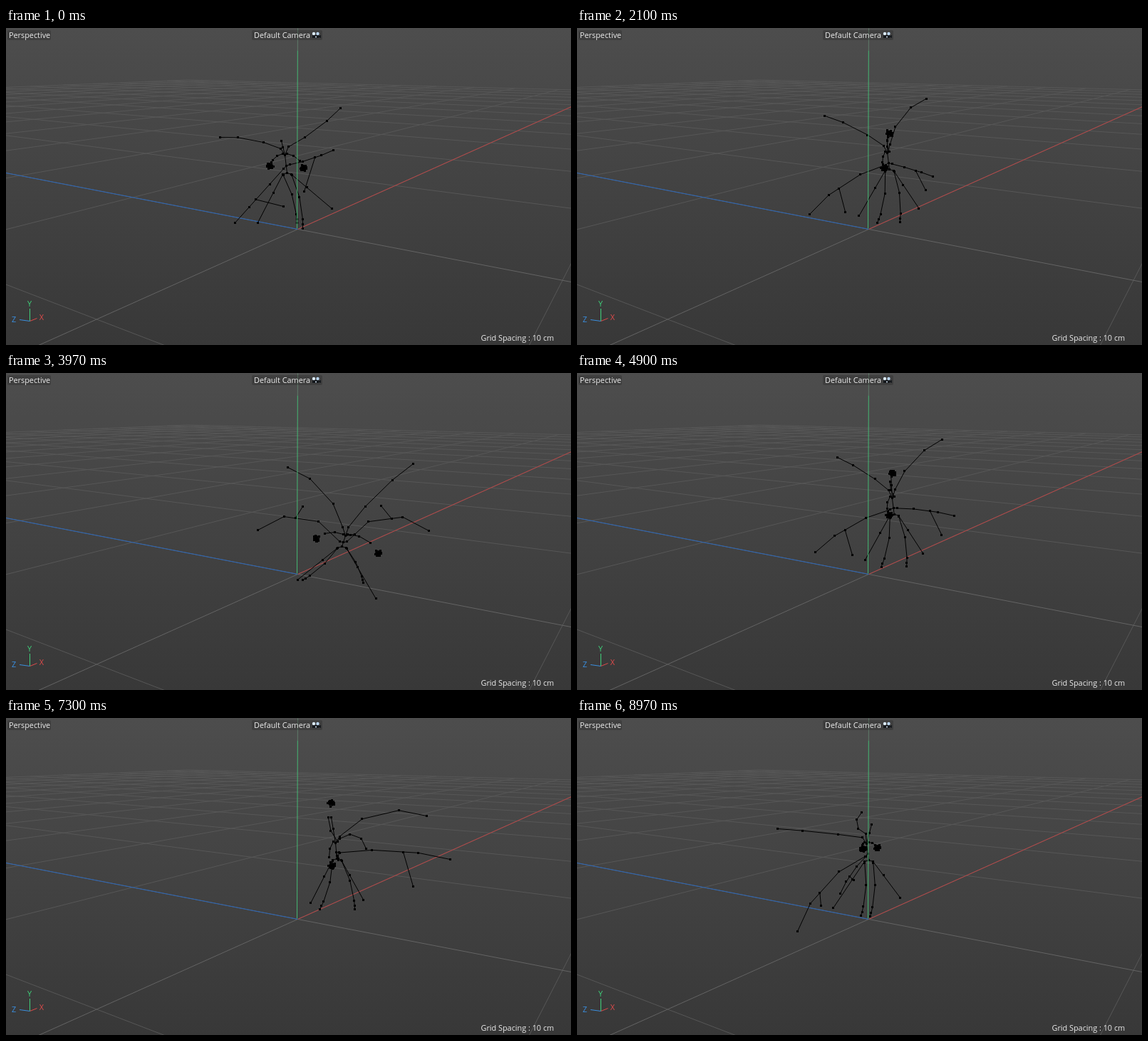
These frames come from a looping animation (793x445 px, 9010 ms). An HTML page with a canvas:

```html
<!DOCTYPE html>
<html lang="en">
<head>
<meta charset="utf-8">
<title>Viewport rig</title>
<style>
html, body { margin: 0; width: 100%; height: 100%; overflow: hidden; }
body { position: relative; background: linear-gradient(#4d4d4d, #383838); }
canvas, svg { position: absolute; left: 0; top: 0; display: block; }
text { font: 10.85px "Open Sans", "Noto Sans", sans-serif; fill: #ececec; }
.tag { fill: #000; opacity: .18; }
.axis { fill: none; stroke-width: 1; }
</style>
</head>
<body>
<canvas id="view" width="793" height="445"></canvas>
<svg width="793" height="445" viewBox="0 0 793 445">
  <rect class="tag" x="2" y="3" width="61" height="14" rx="2"/>
  <rect class="tag" x="345" y="3" width="99" height="14" rx="2"/>
  <text x="4" y="14">Perspective</text>
  <text x="348" y="14">Default Camera</text>
  <text x="666.5" y="439">Grid Spacing : 10 cm</text>
  <path d="M430 10h9v4h-9zM439 11l3-1v4l-3-1z" fill="#15181c"/>
  <circle cx="432" cy="8" r="2.2" fill="#dcebfa"/>
  <circle cx="437.5" cy="8" r="2.2" fill="#b9d5f0"/>
  <circle cx="435" cy="12.5" r="1" fill="#dcebfa"/>
  <path class="axis" stroke="#3fd07a" d="M33.5 411V394"/>
  <path class="axis" stroke="#e04a4a" d="M33.5 411.5L43.5 407.5"/>
  <path class="axis" stroke="#3a8fe0" d="M33.5 411.5L19 409.5"/>
  <g text-anchor="middle">
    <text x="33" y="391" style="fill:#3fd07a">Y</text>
    <text x="50" y="410" style="fill:#e04a4a">X</text>
    <text x="11" y="413" style="fill:#3a8fe0">Z</text>
  </g>
</svg>
<script>
const ctx = document.getElementById('view').getContext('2d');
const FPS = 30, CYCLE = 90, LOOP = 9010;

// Key poses by frame. Joints between a limb's base and its tip follow from rules.
// body: chest, hip | head: offset from chest | upper wings: tip, bend
// lower wings: tip, bend, side tip | skirt: half width, lean
const tracks = {};
function pose(frame, parts) {
  for (const name in parts) (tracks[name] ||= []).push({ frame, p: parts[name] });
}

pose(0, {
  body: [391,178, 394,203], head: [-5,-20],
  upperL: [300,153, .06], upperR: [469,112, .04],
  lowerL: [321,273, 0, 389,250], lowerR: [459,171, .03, 418,229],
  hands: [370,193, 417,196], feet: [408,273, 416,281], skirt: [52,-10]
});
pose(5, {
  body: [380,180, 386,206], head: [-11,-14],
  upperL: [326,137, .2], upperR: [494,126, .04],
  lowerL: [342,203, -.2, 410,206], lowerR: [478,134, .08, 444,198],
  hands: [343,185, 420,184], feet: [405,278, 426,276], skirt: [52,-10]
});
pose(16, {
  body: [452,218, 455,250],
  upperL: [380,80, .1], upperR: [510,72, -.03],
  lowerL: [342,215, .1, 395,250], lowerR: [544,175, -.1, 530,220],
  feet: [430,328, 480,342]
});
pose(29, {
  body: [476,228, 471,243], head: [13,-2],
  upperL: [395,132, .13], upperR: [571,127, -.04],
  lowerL: [353,220, .25, 416,187], lowerR: [593,221, -.25, 526,186],
  hands: [435,232, 522,253], feet: [416,290, 501,294], skirt: [55,13]
});
pose(34, {
  body: [467,175, 466,197], head: [-4,-33],
  upperL: [535,216, -.2], upperR: [596,147, -.13],
  lowerL: [473,199, 0, 470,192], lowerR: [622,207, -.04, 583,250],
  hands: [455,203, 467,122], feet: [432,265, 488,271], skirt: [34,6]
});
pose(39, {
  body: [462,175, 464,197], head: [-6,-36],
  upperL: [505,183, -.34], upperR: [590,137, -.16],
  lowerL: [466,199, 0, 467,188], lowerR: [623,198, -.05, 571,236],
  hands: [457,207, 456,119], feet: [440,268, 489,268], skirt: [37,-2]
});
pose(48, {
  upperL: [400,118, 0], upperR: [545,90, -.05],
  lowerL: [355,235, .05, 405,245], lowerR: [575,190, -.05, 545,228]
});
pose(89, {
  body: [406,176, 409,199], head: [7,-27],
  upperL: [281,155, .01], upperR: [399,132, -.35],
  lowerL: [309,299, .11, 342,263], lowerR: [369,246, .05, 388,227],
  hands: [401,183, 421,182], feet: [398,277, 411,278], skirt: [47,-7]
});

// Smooth Hermite blend through the keys of one part.
function sample(name, f) {
  const keys = tracks[name], last = keys.length - 1;
  let i = 0;
  while (i < last - 1 && keys[i + 1].frame <= f) i++;
  const a = keys[i], b = keys[i + 1];
  const before = keys[Math.max(0, i - 1)], after = keys[Math.min(last, i + 2)];
  const span = b.frame - a.frame, u = (f - a.frame) / span;
  const u2 = u * u, u3 = u2 * u;
  return a.p.map((pa, n) => {
    const pb = b.p[n];
    const ta = (pb - before.p[n]) / (b.frame - before.frame) * span;
    const tb = (after.p[n] - pa) / (after.frame - a.frame) * span;
    return (2 * u3 - 3 * u2 + 1) * pa + (u3 - 2 * u2 + u) * ta
         + (3 * u2 - 2 * u3) * pb + (u3 - u2) * tb;
  });
}

const add = (p, x, y) => [p[0] + x, p[1] + y];
const mix = (a, b, k) => [a[0] + (b[0] - a[0]) * k, a[1] + (b[1] - a[1]) * k];
function toward(a, b, dist) {
  return mix(a, b, dist / (Math.hypot(b[0] - a[0], b[1] - a[1]) || 1));
}

// Joints at the given fractions of a bowed line; bend is the bow's height over its length.
function arc(a, b, bend, stops) {
  const dx = b[0] - a[0], dy = b[1] - a[1];
  return [a, ...stops.map(k => {
    const bow = 4 * k * (1 - k) * bend;
    return add(a, dx * k - dy * bow, dy * k + dx * bow);
  })];
}

function line(a, b, color) {
  ctx.strokeStyle = color;
  ctx.beginPath();
  ctx.moveTo(a[0] + .5, a[1] + .5);
  ctx.lineTo(b[0] + .5, b[1] + .5);
  ctx.stroke();
}

function chain(points) {
  points.forEach((p, i) => {
    if (i) line(points[i - 1], p, '#000');
    ctx.fillStyle = '#000';
    ctx.fillRect(Math.round(p[0]) - 1, Math.round(p[1]) - 1, 3, 3);
  });
}

function hand(wrist, palm) {
  const tip = toward(palm, wrist, -4);
  for (let k = -2; k <= 2; k++) {
    chain(arc(wrist, tip, k * .25, [.4, .7, 1 - Math.abs(k) * .1]));
  }
}

const WING = [.29, .71, 1], LEG = [.02, .43, .83, .93, 1], TAIL = [.38, 1], ARM = [.3, .65];

function rig(f) {
  const get = name => sample(name, f);
  const body = get('body'), chest = body.slice(0, 2), hip = body.slice(2);
  const mid = mix(chest, hip, .6), head = get('head');
  const hands = get('hands'), feet = get('feet'), [width, lean] = get('skirt');
  const drift = ((feet[0] + feet[2]) / 2 - hip[0]) * .6;
  chain([chest, mid, hip]);
  chain(arc(chest, add(chest, ...head), 0, [.55, 1]));

  ['L', 'R'].forEach((s, i) => {
    const side = i * 2 - 1;
    const [ux, uy, uBend] = get('upper' + s);
    const root = toward(add(chest, 0, -8), [ux, uy], 6);
    chain([chest, ...arc(root, [ux, uy], uBend, WING)]);

    const [lx, ly, lBend, bx, by] = get('lower' + s);
    const wing = arc(toward(mid, [lx, ly], 5), [lx, ly], lBend, WING);
    chain([mid, ...wing]);
    chain([mix(wing[1], wing[2], .67), [bx, by]]);

    const palm = hands.slice(i * 2, i * 2 + 2);
    const arm = arc(add(chest, side * 3, -2), palm, side * -.15, ARM);
    chain([chest, ...arm]);
    hand(toward(palm, arm[2], 5), palm);

    const socket = add(hip, side * 6, 2);
    chain([hip, ...arc(socket, feet.slice(i * 2, i * 2 + 2), -.06, LEG)]);
    chain(arc(socket, add(hip, drift + side * width, 60 + side * lean), 0, TAIL));
  });
}

// Ground plane in perspective: a steps along X, b along Z.
const ORIGIN = [409, 282], HORIZON = 44.6, EDGE = 13, SX = .3475, SZ = .232;
function ground(a, b) {
  const x = SX * a, z = SZ * b, w = 1 + x + z;
  return [(ORIGIN[0] + x * 939 - z * 821) / w, (ORIGIN[1] + HORIZON * (x + z)) / w];
}

function floor() {
  for (let n = -EDGE; n <= EDGE; n++) {
    const nearA = Math.max(-EDGE, (.04 - 1 - SZ * n) / SX);
    const nearB = Math.max(-EDGE, (.04 - 1 - SX * n) / SZ);
    const color = n ? '#575757' : '#646464';
    if (nearA < EDGE) line(ground(nearA, n), ground(EDGE, n), color);
    if (nearB < EDGE) line(ground(n, nearB), ground(n, EDGE), color);
  }
  line(ORIGIN, ground(EDGE, 0), '#b84444');
  line(ORIGIN, ground(0, EDGE), '#2a66b8');
}

let start;
function draw(now) {
  start ??= now;
  const t = (now - start) % LOOP;
  const step = Math.min(3 * CYCLE - 1, Math.floor((t + 4) * FPS / 1000));
  ctx.clearRect(0, 0, 793, 445);
  floor();
  rig(step % CYCLE);
  line([408, 281], [408.8, 31], '#45b873');
  line([408.8, 31], [409, 0], '#5f7a69');
  requestAnimationFrame(draw);
}
requestAnimationFrame(draw);
</script>
</body>
</html>
```
